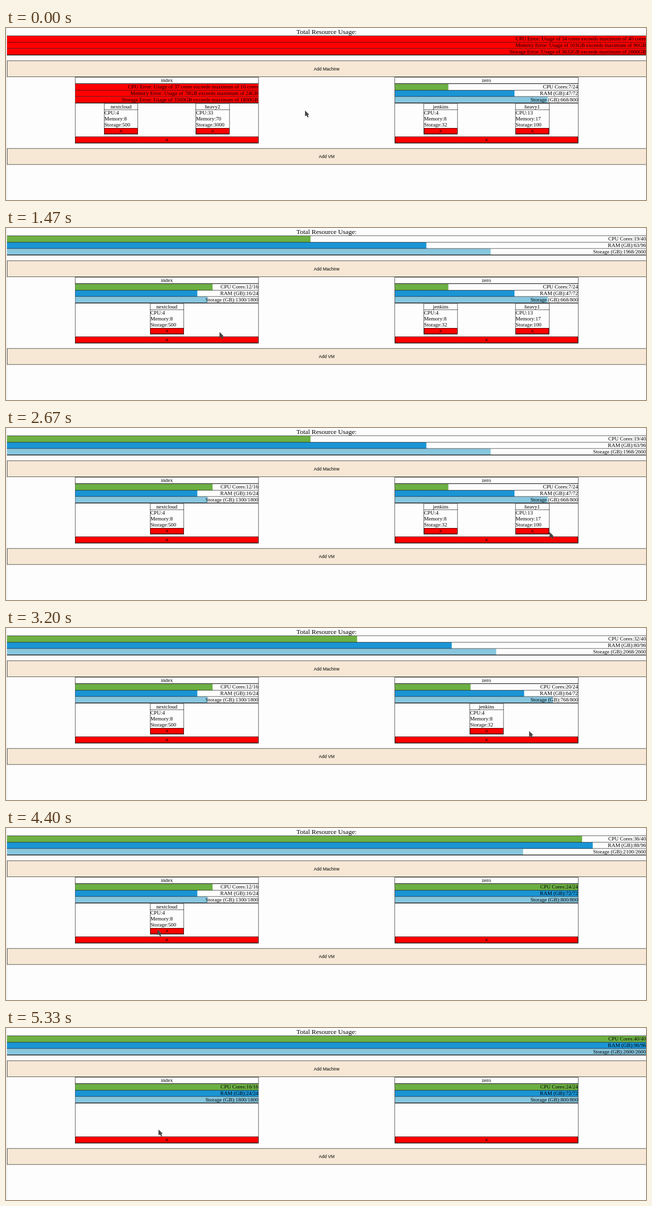
These frames come from a looping animation (1280x344 px, 5.39 s). An HTML page with a canvas:

```html
<!DOCTYPE html>
<html lang="en">
<head>
<meta charset="utf-8">
<title>Resource usage</title>
<style>
html, body { margin: 0; width: 1280px; height: 344px; overflow: hidden; background: #fdfdfd; }
canvas { display: block; }
</style>
</head>
<body>
<canvas id="stage" width="1280" height="344"></canvas>
<script>
const ctx = document.getElementById('stage').getContext('2d');
const LOOP = 5390;
const SCALE = 2 / 3; // the page is laid out 1920 px wide
const SERIF = '"Liberation Serif", serif';
const SANS = '"Liberation Sans", sans-serif';
const PAPER = '#fdfdfd', CREAM = '#f6e8d5', RED = '#f00';
const ROW = 19, MACHINE_W = 551, VM_W = 102;

const resources = [
  { label: 'CPU Cores', error: 'CPU', unit: ' cores', color: '#6cb043' },
  { label: 'RAM (GB)', error: 'Memory', unit: 'GB', color: '#1b94d4' },
  { label: 'Storage (GB)', error: 'Storage', unit: 'GB', color: '#88c6de' }
];

// Each VM disappears at "removed"; "fade" is how long the bars take to follow.
const machines = [
  { name: 'index', x: 207, max: [16, 24, 1800], vms: [
    { name: 'nextcloud', use: [4, 8, 500], removed: 4560, fade: 600 },
    { name: 'heavy2', use: [33, 70, 3000], removed: 1370, fade: 1 }
  ] },
  { name: 'zero', x: 1166, max: [24, 72, 800], vms: [
    { name: 'jenkins', use: [4, 8, 32], removed: 3768, fade: 600 },
    { name: 'heavy1', use: [13, 17, 100], removed: 3100, fade: 600 }
  ] }
];
const total = {
  max: resources.map((_, i) => machines.reduce((sum, m) => sum + m.max[i], 0)),
  vms: machines.flatMap(m => m.vms)
};

// Pointer path in stage pixels: time, x, y
const path = [
  [0, 598, 165], [930, 456, 197], [1340, 427, 207], [1470, 427, 208],
  [2670, 1087, 208], [3100, 1055, 206], [3600, 972, 206], [3760, 950, 205],
  [3870, 744, 191], [4200, 300, 203], [4560, 305, 203], [LOOP, 305, 203]
];

// CSS "ease": cubic-bezier(.25, .1, .25, 1)
function ease(x) {
  if (x <= 0) return 0;
  if (x >= 1) return 1;
  const bezier = (s, a, b) => 3 * s * (1 - s) ** 2 * a + 3 * s * s * (1 - s) * b + s ** 3;
  let lo = 0, hi = 1;
  for (let i = 0; i < 20; i++) {
    const mid = (lo + hi) / 2;
    if (bezier(mid, .25, .25) < x) lo = mid; else hi = mid;
  }
  return bezier(lo, .1, 1);
}

function rect(x, y, w, h, color = '#000') {
  ctx.fillStyle = color;
  ctx.fillRect(x, y, w, h);
}

function box(x, y, w, h, fill) {
  rect(x, y, w, h, fill);
  ctx.strokeStyle = '#000';
  ctx.lineWidth = 1;
  ctx.strokeRect(x + .5, y + .5, w - 1, h - 1);
}

function text(str, x, y, align = 'center', size = 16, family = SERIF) {
  ctx.font = `${size}px ${family}`;
  ctx.textAlign = align;
  ctx.fillStyle = '#000';
  ctx.fillText(str, x, y);
}

function button(label, x, y, w, h, fill) {
  box(x, y, w, h, fill);
  text(label, x + w / 2, y + h / 2 + 4.5, 'center', 13.333, SANS);
}

function drawBars(owner, x, y, w, t) {
  resources.forEach((res, i) => {
    const top = y + 1 + i * ROW, max = owner.max[i];
    let used = 0, shown = 0;
    for (const vm of owner.vms) {
      if (t < vm.removed) used += vm.use[i];
      shown += vm.use[i] * (1 - ease((t - vm.removed) / vm.fade));
    }
    const over = used > max;
    const share = over ? 1 : Math.max(0, 1 - shown / max);
    rect(x, top, w * share, ROW, over ? RED : res.color);
    const label = over
      ? `${res.error} Error: Usage of ${used}${res.unit} exceeds maximum of ${max}${res.unit}`
      : `${res.label}:${max - used}/${max}`;
    text(label, x + w, top + 14, 'right');
  });
  for (let i = 0; i < 4; i++) rect(x, y + i * ROW, w, i === 3 ? 2 : 1);
}

function drawVm(vm, center) {
  const x = Math.round(center - VM_W / 2);
  box(x, 226, VM_W, 93, PAPER);
  text(vm.name, center, 241);
  rect(x, 245, VM_W, 1);
  ['CPU', 'Memory', 'Storage'].forEach((key, i) =>
    text(`${key}:${vm.use[i]}`, x + 1, 260 + 18 * i, 'left'));
  button('X', x + 1, 300, VM_W - 2, 18, RED);
}

function drawMachine({ x, name, max, vms }, t) {
  const inner = MACHINE_W - 2, center = x + MACHINE_W / 2;
  box(x, 147, MACHINE_W, 199, PAPER);
  text(name, center, 162);
  rect(x, 166, MACHINE_W, 1);
  drawBars({ max, vms }, x + 1, 167, inner, t);
  const live = vms.filter(vm => t < vm.removed);
  live.forEach((vm, i) => drawVm(vm, center + (i - (live.length - 1) / 2) * inner / 2));
  button('X', x + 1, 326, inner, 19, RED);
}

function drawPage(t) {
  ctx.save();
  ctx.scale(SCALE, SCALE);
  text('Total Resource Usage:', 961.5, 18, 'center', 20);
  drawBars(total, 3, 23, 1917, t);
  button('Add Machine', 3, 98, 1918, 49, CREAM);
  button('Add VM', 3, 361, 1918, 49, CREAM);
  machines.forEach(m => drawMachine(m, t));
  ctx.restore();
}

function drawPointer(t) {
  const i = path.findIndex(p => p[0] > t);
  const [t0, x0, y0] = path[i - 1], [t1, x1, y1] = path[i];
  const k = (t - t0) / (t1 - t0), s = k * k * (3 - 2 * k);
  ctx.save();
  ctx.translate(x0 + (x1 - x0) * s, y0 + (y1 - y0) * s);
  ctx.fillStyle = '#484848';
  ctx.fill(new Path2D('M0 0V11.5L2.6 9.8 5.5 14 7.3 12.6 5.6 9 8.2 8Z'));
  ctx.restore();
}

function draw(t) {
  rect(0, 0, 1280, 344, PAPER);
  rect(1, 0, 1, 344, '#e2e2e2');
  drawPage(t);
  drawPointer(t);
}

const start = performance.now();
function tick() {
  draw((performance.now() - start) % LOOP);
  requestAnimationFrame(tick);
}
tick();
</script>
</body>
</html>
```
